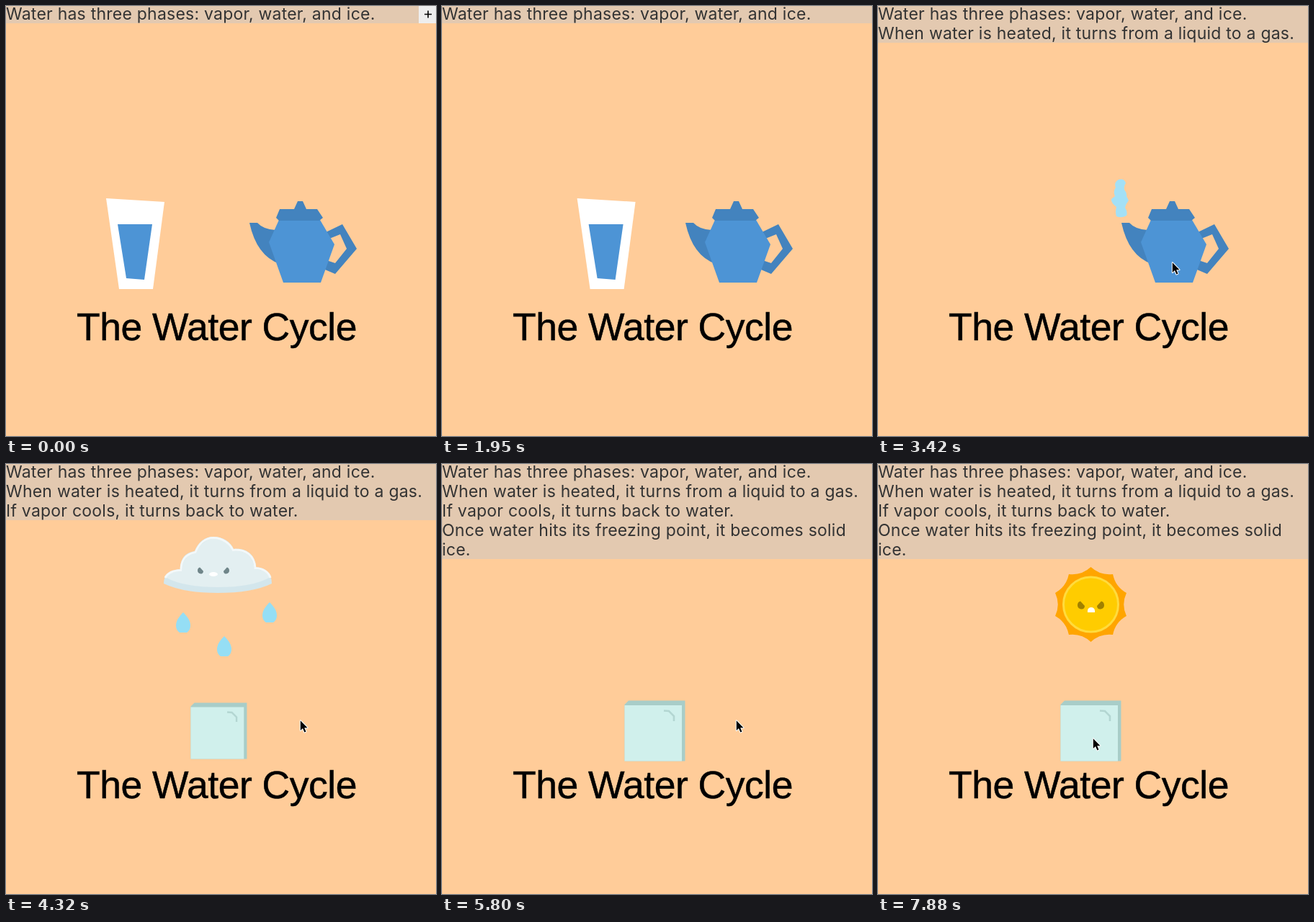
Animation, 597 px wide and 597 px high, one loop 8000 ms. Source, as an HTML page:

```html
<!DOCTYPE html>
<html lang="en">
<head>
<meta charset="utf-8">
<title>The Water Cycle</title>
<style>
  html, body { margin: 0; width: 100%; height: 100%; overflow: hidden; background: #fc9; }
  svg { display: block; width: 597px; height: 597px; }
  .title { font: 53.5px "Liberation Sans", Arial, sans-serif; letter-spacing: -.5px; stroke: #000; stroke-width: .5px; }
  .notes { font: 23px Inter, sans-serif; letter-spacing: .23px; fill: #333; }
</style>
</head>
<body>
<svg viewBox="0 0 597 597">
  <defs>
    <path id="drop" d="M0 0C3 3 10 10 10 18C10 23 8 26 5 28H-5C-8 26-10 23-10 18C-10 10-3 3 0 0Z"/>
    <path id="eye" d="M-5 0C-5-3-3.500-5-1-5.500L5 1C5 4 3 5.500 1 5.500C-3 5.500-5 3-5 0Z"/>
  </defs>
  <rect width="597" height="597" fill="#fc9"/>
  <text class="title" x="98" y="464">The Water Cycle</text>

  <g id="vapor">
    <path fill="#a3e0f6" d="M334 241Q342 239 344 246Q341 250 342 255Q346 260 345 264L348 270Q344 275 343 280Q347 286 345 291Q338 295 331 292Q329 286 331 279Q323 273 324 268L329 264Q326 258 330 252Q327 245 334 241Z"/>
  </g>

  <g id="teapot">
    <g fill="#4383be">
      <path d="M338 301H349Q357 310 374 311L380 358Q348 347 338 301Z"/>
      <path fill-rule="evenodd" d="M440 316L467 303L487 337L457 372L436 363ZM449 323L464 317L473 337L457 357L445 353Z"/>
    </g>
    <path fill="#4d94d5" d="M379 297H436L456 331L437 384H385L365 328Z"/>
    <path fill="#4383be" d="M405 271H412L417 282H432L440 294L435 298H379L375 294L380 282H400Z"/>
  </g>

  <g id="glass">
    <path fill="#fff" d="M139 267L220 272L204 393H157Z"/>
    <path fill="#4d94d5" d="M155 303H203L192 380L167 378Z"/>
  </g>

  <g id="cube">
    <path fill="#a8cdc8" d="M259 328.500H337.500V412.500H253.500V334Z"/>
    <path fill="#d0f0ec" d="M253.500 335H333V412.500H253.500Z"/>
    <path fill="none" stroke="#b3d6d2" stroke-width="2.600" d="M308 342.500L315 343L322 350V357"/>
  </g>

  <g id="cloud">
    <path fill="#d3e6ec" d="M219 166Q219 148 242 146C242 131 249 123 262 121C267 108 276 101 288 101C301 101 312 108 316 118C334 116 346 126 347 143C361 144 369 152 369 166Q342 179 294 179Q246 179 219 166Z"/>
    <path fill="#e3eff1" d="M221 157Q227 149 245 149C244 134 251 126 264 124C269 111 278 104 288 104C300 104 310 111 314 121C332 119 343 128 345 146C357 147 364 151 367 157Q343 171 294 171Q245 171 221 157Z"/>
    <path fill="none" stroke="#f3f8f9" stroke-width="3" d="M221 158Q226 148 243 147.500C243 132 250 125 263 122.500C268 110 277 102.500 288 102.500C300 102.500 311 110 315 119.500C333 118 345 127 346 144.500C357 145 365 150 367 158"/>
    <g fill="#6f8589">
      <use href="#eye" transform="translate(270 148) scale(.8)"/>
      <use href="#eye" transform="translate(306 148) scale(-.8 .8)"/>
    </g>
    <ellipse cx="288" cy="153" rx="6" ry="3" fill="#fff"/>
  </g>

  <g id="drops" fill="#95def5">
    <use href="#drop" x="246" y="234"/>
    <use href="#drop" x="366" y="220"/>
    <use href="#drop" x="303" y="267"/>
  </g>

  <g id="sun">
    <path id="rays" fill="#ffa500"/>
    <circle cx="295.500" cy="195" r="38" fill="#fc0" stroke="#ffdb3d" stroke-width="3"/>
    <g fill="#a08000">
      <use href="#eye" transform="translate(282 196)"/>
      <use href="#eye" transform="translate(309 196) scale(-1 1)"/>
    </g>
    <path fill="#fff" d="M291 206V203Q292 199 296 199Q300 199 301 203V206Z"/>
  </g>

  <rect id="panel" width="597" fill="rgba(200,200,200,.5)"/>
  <g id="notes" class="notes"></g>
  <g id="plus">
    <rect x="573" width="24" height="24" fill="#eee"/>
    <path stroke="#000" stroke-width="1.600" d="M581 11.500H591M586 6.500V16.500"/>
  </g>

  <g id="cursor">
    <path stroke="#fff" stroke-width="2" stroke-linejoin="round" paint-order="stroke" d="M.8 1.200V15L4 12L6.400 17.500L8.500 16.600L6.200 11.200H10.500Z"/>
  </g>
</svg>
<script>
const LOOP = 8000, TICK = 145;
const NOTES = [
  [0, "Water has three phases: vapor, water, and ice."],
  [2690, "When water is heated, it turns from a liquid to a gas."],
  [3570, "If vapor cools, it turns back to water."],
  [5500, "Once water hits its freezing point, it becomes solid"],
  [5500, "ice."]
];
// Visible interval of each part
const SHOWN = {
  plus: [0, 600],
  glass: [0, 2690],
  teapot: [0, 3570],
  vapor: [2690, 3570],
  cloud: [3570, 5500],
  drops: [3570, 5500],
  cube: [3570, LOOP],
  sun: [6990, LOOP],
  cursor: [2830, LOOP]
};
// Pointer stops: time, x, y
const POINTER = [
  [2830, 432, 549], [2980, 425, 470], [3130, 412, 385], [3280, 408, 355],
  [6550, 360, 374], [6700, 311, 385], [6850, 298, 380]
];

const el = id => document.getElementById(id);
const move = (id, x, y) => el(id).setAttribute("transform", `translate(${x} ${y})`);
// Number of ticks passed since start, limited to max
const steps = (t, start, max, tick = TICK) =>
  Math.max(0, Math.min(max, Math.floor((t - start) / tick) + 1));

const lines = NOTES.map(([, text], i) => {
  const line = document.createElementNS("http://www.w3.org/2000/svg", "text");
  line.textContent = text;
  line.setAttribute("y", 19 + 27 * i);
  el("notes").append(line);
  return line;
});

// Ten tips joined by hollow curves
const ray = (r, turn) => {
  const a = turn * Math.PI / 5;
  return `${295.5 + r * Math.sin(a)} ${195 - r * Math.cos(a)}`;
};
let rays = "M" + ray(52, 0);
for (let i = 0; i < 10; i++) rays += `Q${ray(42, i + .5)} ${ray(52, i + 1)}`;
el("rays").setAttribute("d", rays);

function render(t) {
  for (const [id, [from, to]] of Object.entries(SHOWN))
    el(id).style.display = t >= from && t < to ? "" : "none";

  let count = 0;
  NOTES.forEach(([from], i) => {
    const on = t >= from;
    lines[i].style.display = on ? "" : "none";
    count += on;
  });
  el("panel").setAttribute("height", 27 * count - 3);

  const slide = steps(t, 1650, 7);
  move("glass", slide ? 19.8 * slide - 10.8 : 0, 0);
  move("vapor", 0, 7 * (5 - steps(t, 2830, 5)));
  move("drops", 0, 7 * (steps(t, 4320, 8) - 5));
  move("sun", 0, 10 * (steps(t, 7740, 2, 140) - 2));

  const size = (78 + 2 * steps(t, 5500, 3)) / 84;
  el("cube").setAttribute("transform",
    `translate(295 370.5) scale(${size}) translate(-295 -370.5)`);

  const stop = POINTER.filter(p => p[0] <= t).pop();
  if (stop) move("cursor", stop[1], stop[2]);
}

const start = performance.now();
function frame() {
  render((performance.now() - start) % LOOP);
  requestAnimationFrame(frame);
}
frame();
</script>
</body>
</html>
```
